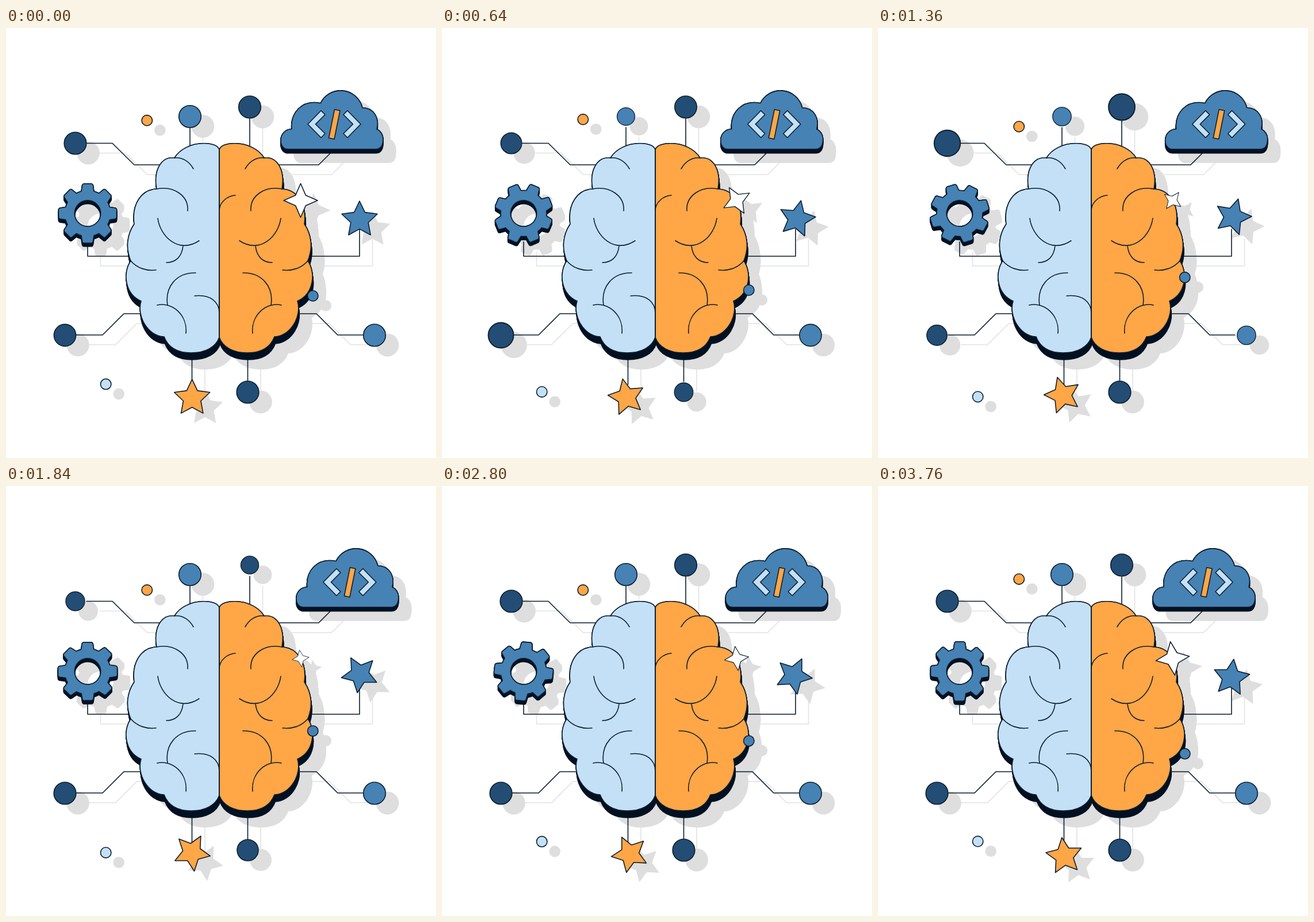
An HTML page that plays this animation: 748x748 px, repeating every 3840 ms.

```html
<!DOCTYPE html>
<html lang="en">
<head>
<meta charset="utf-8">
<title>Brain and circuits</title>
<style>
html, body { margin: 0; width: 100%; height: 100%; overflow: hidden; background: #fff; }
svg { display: block; width: 100vw; height: 100vh; }
.ink { stroke: #0b1d2e; stroke-width: 1.6; stroke-linejoin: round; stroke-linecap: round; }
.wire { fill: none; }
.navy { fill: #234d74; }
.blue { fill: #4682b4; }
.light { fill: #c3e0f7; }
.orange { fill: #ffa646; }
.white { fill: #fff; }
.deep { fill: #001122; stroke: #001122; stroke-width: 1.6; stroke-linejoin: round; }
.shade { fill: #dedede; stroke: none; }
.shade .wire { fill: none; stroke: #e2e2e2; stroke-width: 1.6; }
</style>
</head>
<body>
<svg viewBox="0 0 748 748" xmlns="http://www.w3.org/2000/svg">
  <defs>
    <path id="half" d="M371 212C369 203 355 200.5 343 200.8C322 201 302 211 293 226C271 223 256 246 262 280C236 281 218 306 223 341C210 360 208 383 217 405C203 425 206 462 235 475C227 500 246 536 275 537C283 558 302 565 322 565C347 565 365 555 371 538Z"/>
    <g id="brain"><use href="#half"/><use href="#half" transform="translate(742 0) scale(-1 1)"/></g>
    <path id="folds" d="M293 226C308 224 320 234 326 245M262 280C292 274 318 292 316 318M264 331C268 362 300 394 336 370M308 379C306 398 295 408 279 408M217 405C228 418 245 423 261 421M330 426C297 425 276 450 281 482M263 482C290 476 316 500 313 531"/>
    <path id="cloud" d="M478 195A19 19 0 0 1 497 175C494 148 514 123 547 130A39 39 0 0 1 620 138C640 138 650 156 645 175A19 19 0 0 1 656 192C656 203 653 210 643 210H491C483 210 478 204 478 195Z"/>
    <path id="gear" fill-rule="evenodd"/>
    <path id="star"/>
    <path id="spark"/>
    <path id="wires" d="M140 200.5H185L223 238H268M320 173V206M424 157V206M475 238H544L566 216M142 372V397H216M615 350V397H526M122 534H168L205 497H236M621 534H577L540 497H506M323.5 570V620M420.5 570V615"/>
  </defs>
  <g id="shadows" class="shade" transform="translate(22.5 17)"></g>
  <g id="scene"></g>
</svg>
<script>
const LOOP = 3840, STEP = 80, BEAT = 400;
const $ = id => document.getElementById(id);
const shadows = $('shadows'), scene = $('scene');

function add(parent, tag, attrs) {
  const el = document.createElementNS('http://www.w3.org/2000/svg', tag);
  for (const k in attrs) el.setAttribute(k, attrs[k]);
  return parent.appendChild(el);
}

function polar(r, deg, ry = r) {
  const a = deg * Math.PI / 180;
  return (r * Math.sin(a)).toFixed(2) + ' ' + (-ry * Math.cos(a)).toFixed(2);
}

function gearPath() {
  let d = '';
  for (let a = 0; a < 360; a += 45) {
    d += (a ? 'A40 40 0 0 1 ' : 'M') + polar(40, a - 16);
    d += 'L' + polar(49, a - 11, 50) + 'Q' + polar(51, a - 10, 52) + ' ' + polar(51, a - 7.5, 52);
    d += 'L' + polar(51, a + 7.5, 52) + 'Q' + polar(51, a + 10, 52) + ' ' + polar(49, a + 11, 50);
    d += 'L' + polar(40, a + 16);
  }
  return d + 'A40 40 0 0 1 ' + polar(40, -16) + 'ZM22.7 0A22.7 22.7 0 1 0 -22.7 0A22.7 22.7 0 1 0 22.7 0Z';
}

function starPath(tips, outer, inner) {
  const pts = [];
  for (let i = 0; i < 2 * tips; i++) pts.push(polar(i % 2 ? inner : outer, i * 180 / tips));
  return 'M' + pts.join('L') + 'Z';
}

$('gear').setAttribute('d', gearPath());
$('star').setAttribute('d', starPath(5, 32.6, 16));
$('spark').setAttribute('d', starPath(4, 29.5, 12.6));

// Stacks shifted copies to give a shape its thickness.
function extrude(parent, id, dx, dy) {
  const n = Math.ceil(dy / 1.5);
  for (let i = n; i >= 0; i--) {
    add(parent, 'use', { href: '#' + id, transform: `translate(${dx * i / n} ${dy * i / n})` });
  }
}

const movers = [];

// A moving group in the scene with a matching one among the shadows.
function mover(transform, draw, drawShade = draw) {
  const front = add(scene, 'g', {}), back = add(shadows, 'g', {});
  draw(front);
  drawShade(back);
  movers.push({ els: [front, back], transform });
}

const turn = t => t / LOOP;
const wave = (t, peak = 0) => Math.cos(2 * Math.PI * turn(t - peak));
const ease = x => (1 - Math.cos(Math.PI * x)) / 2;

function pulse(t) {
  const keys = [1, 0.8, 1.2, 0.8, 1];
  const u = ((t + LOOP) % LOOP) / BEAT, i = Math.floor(u);
  return i > 3 ? 1 : keys[i] + (keys[i + 1] - keys[i]) * ease(u - i);
}

function disc(r, color) {
  return g => add(g, 'circle', { r, class: 'ink ' + color });
}
const plainDisc = r => g => add(g, 'circle', { r: r + 0.6 });

// wires
add(shadows, 'use', { href: '#wires', class: 'wire' });
add(scene, 'use', { href: '#wires', class: 'wire ink' });

// brain
extrude(shadows, 'brain', 1.5, 12);
extrude(add(scene, 'g', { class: 'deep' }), 'brain', 1.5, 12);
const brain = add(scene, 'g', { class: 'ink' });
const flip = 'translate(742 0) scale(-1 1)';
add(brain, 'use', { href: '#half', class: 'light' });
add(brain, 'use', { href: '#half', class: 'orange', transform: flip });
const folds = add(brain, 'g', { class: 'wire' });
add(folds, 'use', { href: '#folds' });
add(folds, 'use', { href: '#folds', transform: flip });
add(folds, 'path', { d: 'M328 466C355 463 371 476 371 496M399 291C385 292 371 303 371 318M371 212V540' });

// pulsing nodes: x, y, color, start of pulse
[
  [120.5, 200.5, 'navy', 500],
  [320, 154, 'blue', 240],
  [424, 137.5, 'navy', 600],
  [102.5, 534.5, 'navy', -60],
  [641, 534.5, 'blue', 45],
  [420.5, 633.5, 'navy', 360]
].forEach(([x, y, color, start]) =>
  mover(t => `translate(${x} ${y}) scale(${pulse(t - start)})`, disc(19.3, color), plainDisc(19.3)));

// floating dots: x, middle, reach, time of lowest point, color
[
  [245.3, 171.5, 13.5, 2320, 'orange'],
  [173.7, 628, 13.5, 1370, 'light'],
  [533.8, 446, 20, 0, 'blue']
].forEach(([x, y, reach, peak, color]) =>
  mover(t => `translate(${x} ${y + reach * wave(t, peak)})`, disc(9.2, color), plainDisc(9.2)));

// stars turn about the middle of their box, a little above their centre
const star = color => g =>
  add(g, 'use', { href: '#star', y: 3.1, class: color && 'ink ' + color });
mover(t => `translate(615 330.5) rotate(${-360 * turn(t)})`, star('blue'), star(''));
mover(t => `translate(323.7 640.7) rotate(${360 * turn(t)})`, star('orange'), star(''));

const spark = cls => g => add(g, 'use', { href: '#spark', class: cls });
mover(t => `translate(512.5 300) rotate(${360 * turn(t)}) scale(${0.75 + 0.25 * wave(t)})`,
  spark('ink white'), spark(''));

mover(() => 'translate(142 322.5)', g => {
  extrude(add(g, 'g', { class: 'deep' }), 'gear', 0, 6);
  add(g, 'use', { href: '#gear', class: 'ink blue' });
}, g => extrude(g, 'gear', 0, 6));

mover(t => `translate(${13.5 * (1 - wave(t))} 0.8)`, g => {
  extrude(add(g, 'g', { class: 'deep' }), 'cloud', 0, 7);
  add(g, 'use', { href: '#cloud', class: 'ink blue' });
  const bracket = 'M548 143L555 150L538.5 166.5L555 183L548 190L525 166.5Z';
  add(g, 'path', { d: bracket, class: 'ink light' });
  add(g, 'path', { d: bracket, class: 'ink light', transform: 'translate(1142 0) scale(-1 1)' });
  add(g, 'path', { d: 'M571.5 141L581 143L571 192.5L561.5 190.5Z', class: 'ink orange' });
}, g => extrude(g, 'cloud', 0, 7));

function render(t) {
  for (const m of movers) {
    for (const el of m.els) el.setAttribute('transform', m.transform(t));
  }
  $('gear').setAttribute('transform', `rotate(${45 * (1 - wave(t))})`);
}

function tick() {
  const t = performance.now() % LOOP;
  render(Math.floor(t / STEP) * STEP);
  requestAnimationFrame(tick);
}
render(0);
requestAnimationFrame(tick);
</script>
</body>
</html>
```
